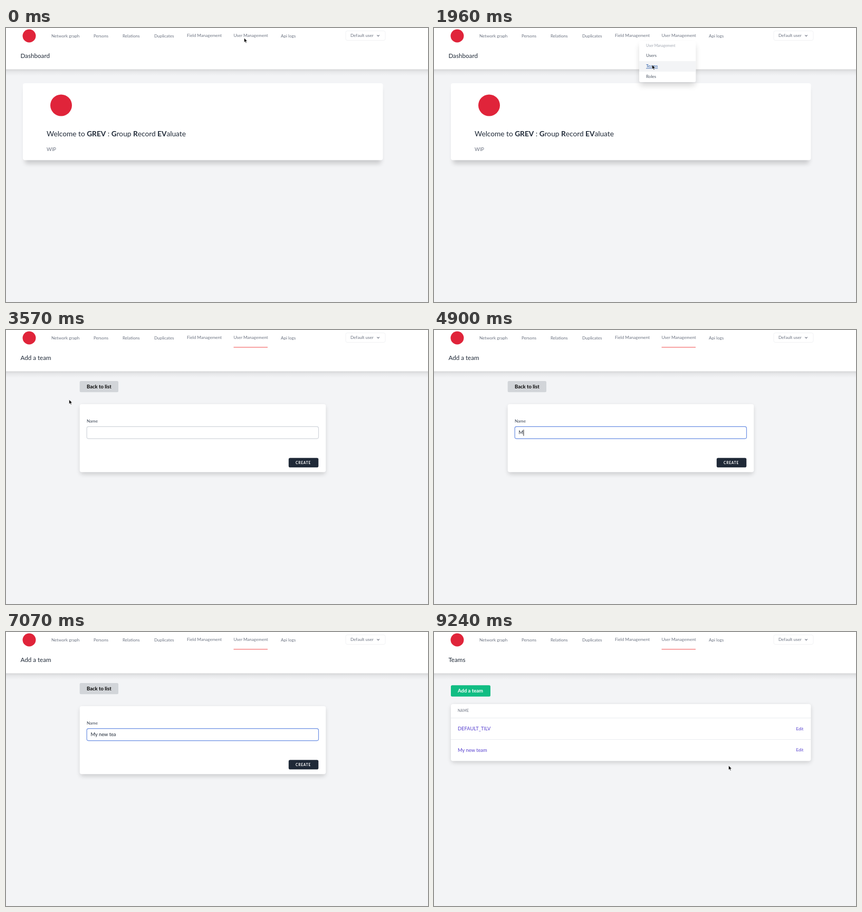
Recreate the animation shown at these times as an HTML page. Size 800 by 521 pixels, loop 9310 ms.

```html
<!DOCTYPE html>
<html lang="en">
<head>
<meta charset="utf-8">
<title>Add a team</title>
<style>
  html, body { margin: 0; width: 100%; height: 100%; overflow: hidden; background: #f3f4f6; }
  svg { display: block; width: 800px; height: 521px; font: 8.1px Lato, "Open Sans", sans-serif; }
  text { white-space: pre; fill: #6b7280; }
  .title { font-size: 11.67px; fill: #1f2937; }
  .bold { font-weight: 700; }
  .btn { font-size: 9.5px; font-weight: 700; }
  .base { font-size: 9.33px; }
  .dark { fill: #374151; }
  .link { fill: #5740cf; }
  .head { font-size: 6.8px; letter-spacing: .3px; }
  .card { fill: #fff; }
  .shade { fill: #000; filter: blur(4px); opacity: .17; }
  .rule { stroke: #e5e7eb; stroke-width: .8; }
  .hide { display: none; }
</style>
</head>
<body>
<svg viewBox="0 0 800 521">
  <defs>
    <linearGradient id="fade" x2="0" y2="1">
      <stop stop-color="#000" stop-opacity=".13"/>
      <stop offset=".45" stop-color="#000" stop-opacity=".045"/>
      <stop offset="1" stop-color="#000" stop-opacity="0"/>
    </linearGradient>
  </defs>
  <rect width="800" height="521" fill="#f3f4f6"/>
  <rect y="78" width="800" height="13" fill="url(#fade)"/>
  <rect width="800" height="78.5" fill="#fff"/>

  <circle cx="44" cy="15" r="12.5" fill="#e0243a"/>
  <g id="nav"></g>
  <rect x="644" y="5.5" width="75" height="18" rx="3" fill="#fff" stroke="#f1f2f4"/>
  <text x="653" y="17">Default user</text>
  <path d="M703.4 13.4l2.2 2.2 2.2-2.2" fill="none" stroke="#6b7280" stroke-width="1.1"/>
  <rect id="active" x="431.5" y="32" width="64.5" height="1.5" fill="#f68585"/>
  <text id="title" class="title" x="27.4" y="57.4"></text>

  <g id="dashboard">
    <rect class="shade" x="36" y="115" width="675" height="143" rx="4"/>
    <rect class="card" x="32" y="105" width="682.5" height="146.3" rx="4"/>
    <circle cx="104.5" cy="147" r="20.5" fill="#e0243a"/>
    <text x="77" y="206.4" style="font-size:13.7px;fill:#1f2937">Welcome to <tspan class="bold">GREV</tspan> : <tspan class="bold">G</tspan>roup <tspan class="bold">R</tspan>ecord <tspan class="bold">EV</tspan>aluate</text>
    <text class="base" x="77" y="234">WIP</text>
  </g>

  <g id="teams">
    <rect id="add" x="32" y="101.3" width="75" height="21.5" rx="2.5"/>
    <text id="addText" class="btn" x="45" y="115.2" style="fill:#fff">Add a team</text>
    <rect id="tableShade" class="shade" x="33" y="140" width="681" rx="4"/>
    <rect id="table" class="card" x="32" y="137" width="682.5" rx="4"/>
    <path class="rule" d="M32 163.5h682.5"/>
    <text class="head" x="45" y="152.4">NAME</text>
    <text class="link base" x="45" y="187">DEFAULT_TILV</text>
    <text class="link" x="686.5" y="186.5">Edit</text>
    <g id="newRow">
      <path class="rule" d="M32 204.5h682.5"/>
      <text class="link base" x="45" y="228">My new team</text>
      <text class="link" x="686.5" y="227.4">Edit</text>
    </g>
  </g>

  <g id="form">
    <rect x="139.7" y="97" width="73.3" height="21.2" rx="2.5" fill="#d2d5d9"/>
    <text class="btn" x="153" y="110.7" style="fill:#000">Back to list</text>
    <rect class="shade" x="141" y="145" width="464" height="129" rx="4"/>
    <rect class="card" x="139.7" y="141" width="466.6" height="129.3" rx="4"/>
    <text class="dark" x="153" y="176">Name</text>
    <rect id="field" x="153.2" y="183.7" width="439.3" height="23" rx="3.5" fill="#fff" stroke-width="1.2"/>
    <text id="typed" class="base" x="160.5" y="198.2" style="fill:#1f2937"></text>
    <rect id="caret" y="189.5" width=".9" height="11.8" fill="#111"/>
    <rect id="create" x="535.8" y="243.2" width="56.5" height="18" rx="2.8"/>
    <text class="bold" x="549" y="254.5" style="font-size:6.6px;letter-spacing:.82px;fill:#fff">CREATE</text>
  </g>

  <g id="menu">
    <rect class="shade" x="390" y="33" width="105" height="76" rx="4" style="filter:blur(6px)"/>
    <rect class="card" x="389" y="25" width="107.3" height="78" rx="3"/>
    <text x="402" y="36" style="font-size:6.9px;fill:#a3a8b2">User Management</text>
    <g id="items"></g>
  </g>

  <g id="pointer">
    <path id="arrow" d="M0 0V8.3L1.9 6.6 3.2 9.5 4.6 8.9 3.3 6.1H5.9Z" fill="#000" stroke="#fff" stroke-width=".6"/>
    <path id="hand" d="M-.8 5.4V.8Q0-.3.9.8V3.3Q1.9 2.7 2.5 3.6 3.5 3.2 4 4 5.2 3.8 5.3 5V7.2L4.4 10H-.1L-2.7 6.3Q-2.8 5-1.7 5.2Z" fill="#fff" stroke="#000" stroke-width=".8" stroke-linejoin="round"/>
    <path id="beam" d="M-1.5-4.5Q0-4.5 0-3.5 0-4.5 1.5-4.5M0-3.5V3.5M-1.5 4.5Q0 4.5 0 3.5 0 4.5 1.5 4.5" fill="none" stroke="#111" stroke-width=".8"/>
  </g>
</svg>
<script>
const LOOP = 9310, STEP = 70;
const NS = 'http://www.w3.org/2000/svg';
const $ = id => document.getElementById(id);
const show = (id, on) => $(id).classList.toggle('hide', !on);

function make(parent, tag, attrs, text = '') {
  const el = document.createElementNS(NS, tag);
  for (const key in attrs) el.setAttribute(key, attrs[key]);
  el.textContent = text;
  return $(parent).appendChild(el);
}

[['Network graph', 86, 18], ['Persons', 166, 18], ['Relations', 221, 18], ['Duplicates', 281, 18],
 ['Field Management', 343, 17], ['User Management', 431.5, 17], ['Api logs', 521, 18]]
  .forEach(([label, x, y]) => make('nav', 'text', { x, y }, label));

const items = ['Users', 'Teams', 'Roles'].map((label, i) => {
  const y = 43 + 20 * i;
  return {
    y,
    back: make('items', 'rect', { x: 389, y, width: 107.3, height: 20, fill: '#f3f4f6' }),
    text: make('items', 'text', { x: 402, y: y + 12.4 }, label)
  };
});

// [time, value] steps
const pages = [[0, 'dashboard'], [2240, 'teams'], [3150, 'form'], [8750, 'teams']];
const titles = { dashboard: 'Dashboard', teams: 'Teams', form: 'Add a team' };
const typing = [[0, ''], [4900, 'M'], [5110, 'My'], [5250, 'My n'], [5390, 'My ne'], [5600, 'My new'],
  [6020, 'My new '], [6300, 'My new t'], [6440, 'My new te'], [6570, 'My new tea'], [7560, 'My new team']];
const FOCUS = 4200, MENU_OPEN = 560;

// [time, x, y] of the pointer tip
const path = [[0, 451.5, 19], [980, 451.5, 19], [1820, 413.5, 70], [2240, 413.5, 70], [2630, 87, 114.5],
  [3350, 87, 114.5], [4060, 230, 193], [7560, 230, 193], [8400, 558.5, 254], [LOOP, 558.5, 254]];

const at = (steps, t) => steps.filter(s => s[0] <= t).pop();
const ease = p => p * p * (3 - 2 * p);

function pointerAt(t) {
  const i = path.findIndex(k => k[0] > t);
  const [t0, x0, y0] = path[i - 1], [t1, x1, y1] = path[i];
  const p = ease((t - t0) / (t1 - t0));
  return [x0 + (x1 - x0) * p, y0 + (y1 - y0) * p];
}

function draw(t) {
  const page = at(pages, t)[1];
  const [x, y] = pointerAt(t);
  const inside = (x0, y0, x1, y1) => x >= x0 && x <= x1 && y >= y0 && y <= y1;

  for (const name in titles) show(name, name === page);
  $('title').textContent = titles[page];
  show('active', page !== 'dashboard');

  const menu = page === 'dashboard' && t >= MENU_OPEN;
  show('menu', menu);
  for (const item of items) {
    const over = menu && inside(389, item.y, 496, item.y + 20);
    const link = over && x < 426;
    item.back.style.opacity = +over;
    item.text.style.fill = link ? '#2357a5' : '#4b5563';
    item.text.style.textDecoration = link ? 'underline' : 'none';
  }

  const added = t >= 8750;
  const overAdd = page === 'teams' && inside(32, 101, 107, 123);
  $('add').style.fill = overAdd ? '#067a56' : '#11bd83';
  $('addText').style.textDecoration = overAdd ? 'underline' : 'none';
  $('table').setAttribute('height', added ? 108.3 : 67.5);
  $('tableShade').setAttribute('height', added ? 108 : 67);
  show('newRow', added);

  const [since, value] = at(typing, t);
  const focused = t >= FOCUS;
  const overCreate = page === 'form' && inside(536, 243, 592, 261);
  $('field').style.stroke = focused ? '#6c8fe3' : '#d1d5db';
  $('typed').textContent = value;
  $('caret').setAttribute('x', 160.8 + (value ? $('typed').getComputedTextLength() : 0));
  show('caret', focused && (t - Math.max(since, FOCUS)) % 1000 < 500);
  $('create').style.fill = overCreate ? '#374151' : '#1f2937';

  const kind = overAdd || overCreate ? 'hand' : page === 'form' && inside(153, 184, 592, 207) ? 'beam' : 'arrow';
  for (const k of ['arrow', 'hand', 'beam']) show(k, k === kind);
  show('pointer', t < 4830 || t >= 7560);
  $('pointer').setAttribute('transform', `translate(${x} ${y})`);
}

const start = performance.now();
function tick() {
  const t = (performance.now() - start) % LOOP;
  draw(Math.floor(t / STEP) * STEP);
  requestAnimationFrame(tick);
}
tick();
</script>
</body>
</html>
```
